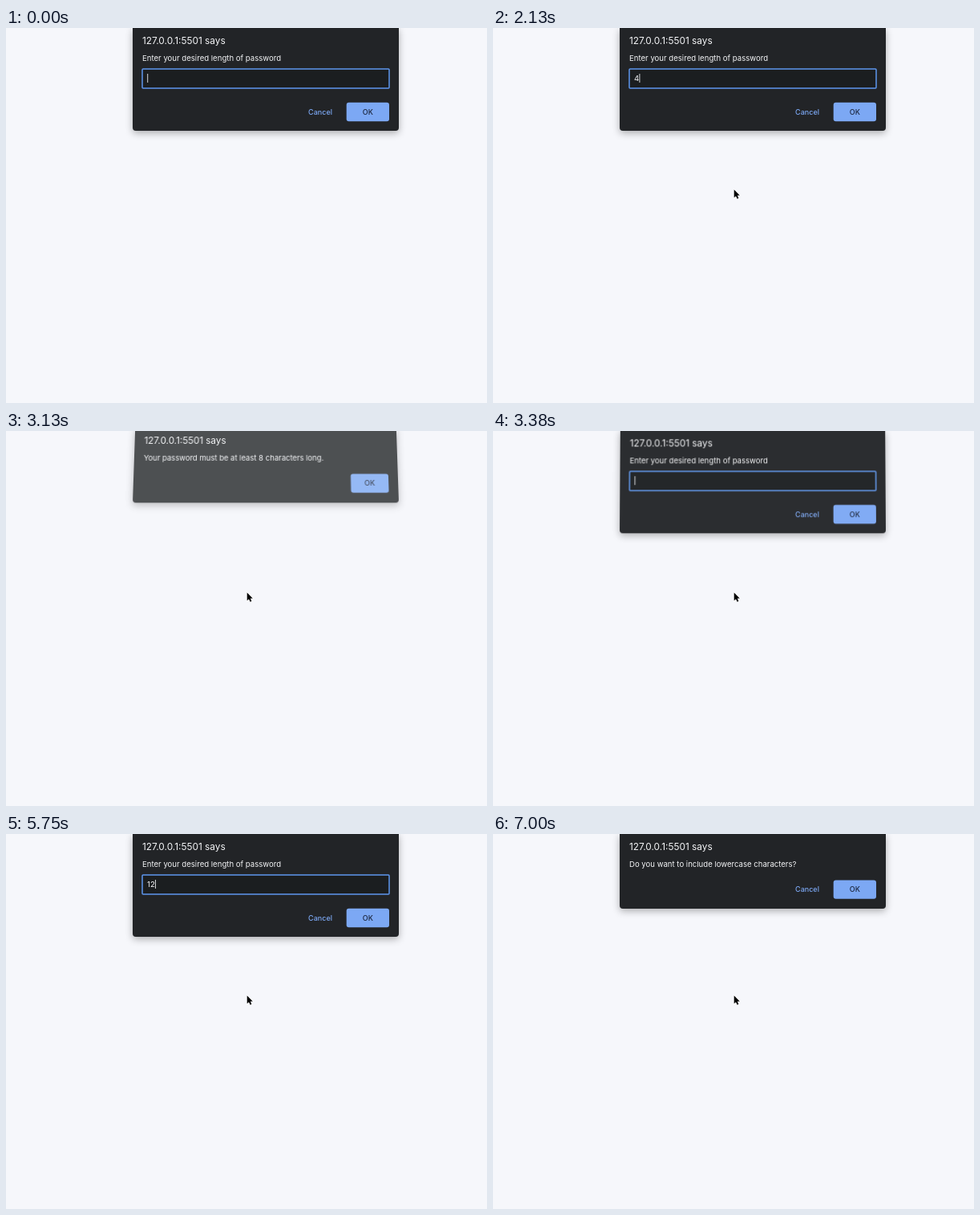
These frames come from a looping animation (600 by 467 pixels, 8 s). An HTML page:

```html
<!DOCTYPE html>
<html lang="en">
<head>
<meta charset="utf-8">
<title>Password prompts</title>
<style>
  html, body { margin: 0; width: 100%; height: 100%; overflow: hidden; background: #f6f7fb; }
  .dialog {
    position: absolute; left: 158px; top: 0; width: 332px;
    background: #222427; border-radius: 0 0 4px 4px;
    box-shadow: 0 3px 10px rgba(0, 0, 0, .3);
    transform-origin: 50% 100%;
  }
  svg { display: block; overflow: visible; }
  text { font: 9.6px Inter, "Liberation Sans", sans-serif; fill: #f4f5f7; }
  .title { font-size: 11.85px; }
  .button { font-size: 9px; font-weight: 500; text-anchor: middle; }
  .cancel { fill: #7ca8f4; }
  .ok { fill: #1d2840; }
  #pointer { position: absolute; left: 0; top: 0; }
</style>
</head>
<body>
<script>
const LOOP = 8000, STEP = 125, BLINK = 500, CLOSING = 240;

const field = `
  <rect x="170" y="51" width="308" height="24" rx="1" fill="#1b1e20" stroke="#5e96ee" stroke-width="1.5"/>
  <text id="typed" x="176" y="66.2"></text>
  <rect id="caret" y="57" width="1" height="11" fill="#d5d7da"/>`;

function makeDialog(message, { height = 92.6, okLeft = 424.7, cancel = true, extras = '' }) {
  const top = height - 35.2, baseline = top + 14.9;
  const dialog = document.createElement('div');
  dialog.className = 'dialog';
  dialog.innerHTML = `<svg width="332" height="${height}" viewBox="158 0 332 ${height}">
    <text class="title" x="170" y="20.2">127.0.0.1:5501 says</text>
    <text x="170" y="41.4">${message}</text>
    ${extras}
    ${cancel ? `<text class="button cancel" x="392" y="${baseline}">Cancel</text>` : ''}
    <rect x="${okLeft}" y="${top}" width="${478 - okLeft}" height="23.4" rx="3" fill="#7ca8f4"/>
    <text class="button ok" x="${(478 + okLeft) / 2}" y="${baseline}">OK</text>
  </svg>`;
  document.body.append(dialog);
  return dialog;
}

const promptDialog = makeDialog('Enter your desired length of password', { height: 128, extras: field });
const alertDialog = makeDialog('Your password must be at least 8 characters long.', { okLeft: 430.7, cancel: false });
const confirmDialog = makeDialog('Do you want to include lowercase characters?', {});

// Each showing of a dialog, with the keys pressed while it is open
const showings = [
  { dialog: promptDialog, open: -500, close: 2125, strokes: [{ at: 1875, key: '4' }] },
  { dialog: alertDialog, open: 2250, close: 3010 },
  { dialog: promptDialog, open: 3250, close: 5935, strokes: [{ at: 5000, key: '1' }, { at: 5750, key: '2' }] },
  { dialog: confirmDialog, open: 6125, close: Infinity }
];

document.body.insertAdjacentHTML('beforeend', `<svg id="pointer" width="600" height="467">
  <path d="M0 0V10L2.3 7.9 3.9 11.5 5.7 10.7 4.1 7.2H7.1Z" stroke="#fff" stroke-width="1.2" paint-order="stroke"/>
</svg>`);

const typed = document.getElementById('typed');
const caret = document.getElementById('caret');
const arrow = document.querySelector('#pointer path');

const settle = (distance, elapsed) => distance * Math.exp(-elapsed / 50);
const liftOut = elapsed => 10 * (Math.max(0, elapsed) / 190) ** 2;

// A lifted sheet fades and tilts back, narrowing towards the top
function poseDialog({ dialog, open, close }, t) {
  const lift = settle(8, t - open) + liftOut(t - close);
  const tilt = -.000058 * lift, stretch = 1 + .0056 * lift;
  dialog.style.visibility = 'visible';
  dialog.style.opacity = 1 - .055 * lift;
  dialog.style.transform = lift > .1
    ? `translateY(${-lift}px) matrix3d(1,0,0,0, 0,${stretch},0,${tilt}, 0,0,1,0, 0,0,0,1)`
    : 'none';
}

// The caret blinks from the moment of focus or of the last key
function drawField({ open, strokes }, t) {
  const pressed = strokes.filter(stroke => stroke.at <= t);
  const lastInput = pressed.length ? pressed.at(-1).at : open + STEP;
  typed.textContent = pressed.map(stroke => stroke.key).join('');
  caret.setAttribute('x', 176.2 + typed.getComputedTextLength());
  caret.setAttribute('opacity', Math.floor((t - lastInput) / BLINK) % 2 ? 0 : 1);
}

function drawPointer(t) {
  const elapsed = t - 2 * STEP, offset = settle(14, elapsed);
  arrow.setAttribute('opacity', elapsed < 0 ? 0 : 1);
  arrow.setAttribute('transform', `translate(${300.7 + offset / 4} ${201.3 + offset})`);
}

function draw(now) {
  const t = Math.floor(now % LOOP / STEP) * STEP;
  for (const { dialog } of showings) dialog.style.visibility = 'hidden';
  for (const showing of showings) {
    if (t < showing.open || t > showing.close + CLOSING) continue;
    poseDialog(showing, t);
    if (showing.strokes) drawField(showing, t);
  }
  drawPointer(t);
}

const start = performance.now();
function tick() {
  draw(performance.now() - start);
  requestAnimationFrame(tick);
}
tick();
</script>
</body>
</html>
```
